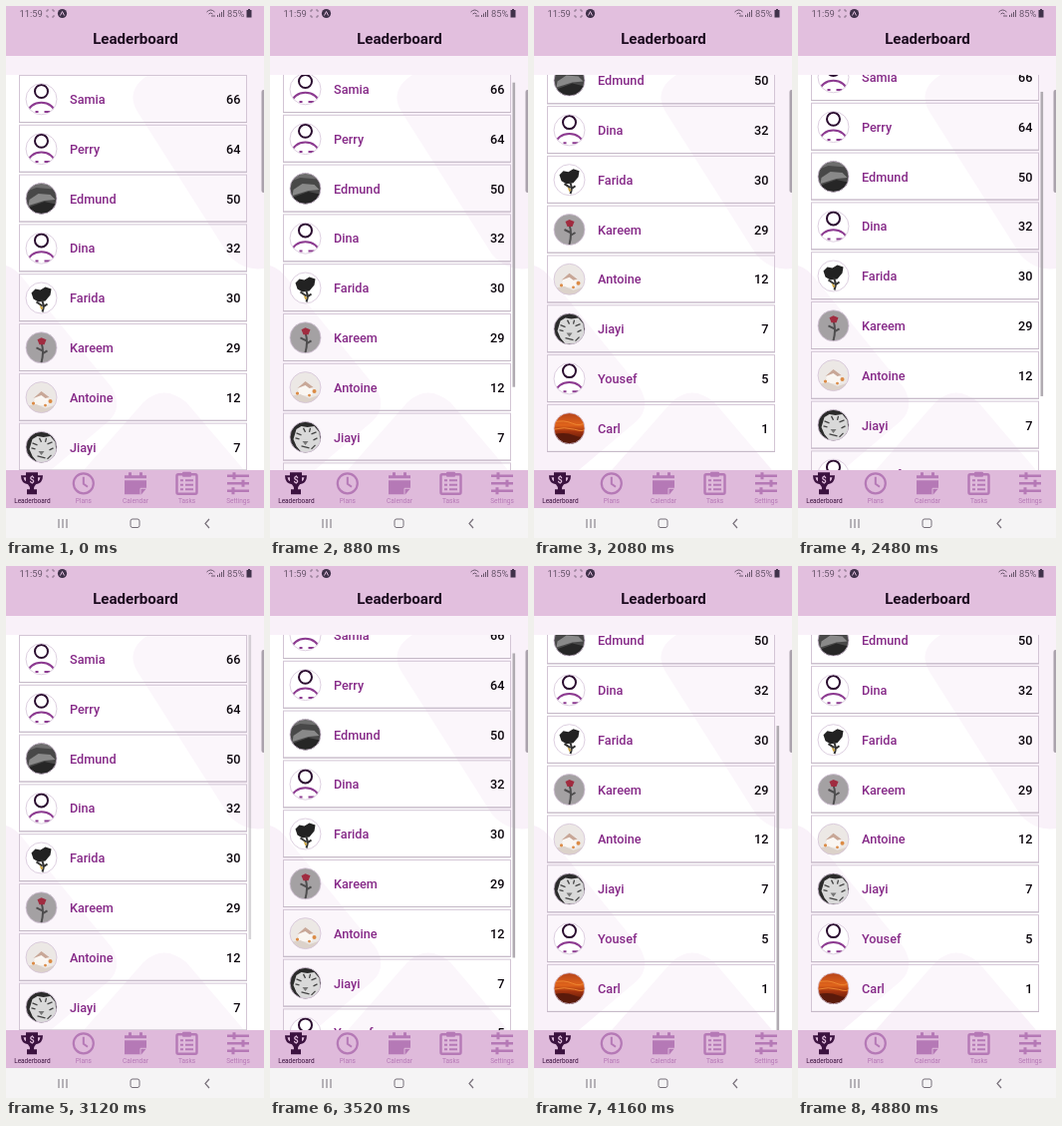
An HTML page that plays this animation: 259 px wide and 533 px high, repeating every 4.96 s.

```html
<!DOCTYPE html>
<html lang="en">
<head>
<meta charset="utf-8">
<title>Leaderboard</title>
<style>
  html, body { margin: 0; width: 100%; height: 100%; overflow: hidden; background: #fff; }
  svg { display: block; width: 100vw; height: 100vh; }
  text { font-family: Roboto, sans-serif; }
  .title { font-size: 15.1px; font-weight: 600; fill: #1c0a1f; text-anchor: middle; }
  .name { font-size: 12.7px; font-weight: 500; fill: #862a88; }
  .score { font-size: 12.7px; font-weight: 500; fill: #0c060d; text-anchor: end; }
  .status { font-size: 9.4px; fill: #68566b; }
  .tab { font-size: 6.5px; text-anchor: middle; fill: currentColor; }
  .line { fill: none; stroke: currentColor; }
</style>
</head>
<body>
<svg viewBox="0 0 259 533" preserveAspectRatio="none">
  <defs>
    <clipPath id="list"><rect y="69" width="259" height="396"/></clipPath>
    <clipPath id="round"><circle r="15.5"/></clipPath>
    <linearGradient id="sunset" x1="0" y1="0" x2="0" y2="1">
      <stop offset="0" stop-color="#b5431a"/>
      <stop offset=".4" stop-color="#e0641b"/>
      <stop offset=".6" stop-color="#a3330f"/>
      <stop offset="1" stop-color="#431208"/>
    </linearGradient>

    <g id="person">
      <circle r="15.5" fill="#fff"/>
      <g fill="none" stroke-width="2">
        <circle cy="-7.8" r="6.5" stroke="#2b0d30"/>
        <path d="M-13.5 14A13.5 10.5 0 0 1 13.5 14M-6 12.8H-3M3 12.8H9" stroke="#8c3a90"/>
      </g>
    </g>
    <g id="road">
      <rect x="-16" y="-16" width="32" height="32" fill="#484848"/>
      <path d="M-16-7L-5-11L16-9V-16H-16Z" fill="#6d6d6d"/>
      <path d="M-12 1L-3-5L9-4L14 1L3 2L-13 7Z" fill="#898989"/>
      <path d="M-16 10L3 3L16 6V16H-16Z" fill="#262626"/>
    </g>
    <g id="darkRose">
      <circle r="15.5" fill="#fff"/>
      <path d="M-10-5L-6-9L-1-8L4-11L10-9L9-3L4 3L-3 4L-8 1Z" fill="#222"/>
      <path d="M0 2Q4 7 1 14M1 8L-5 4M2 9L6 6" fill="none" stroke="#333" stroke-width="2"/>
      <path d="M-2 7L2 10L0 12Z" fill="#c9a23c"/>
    </g>
    <g id="redRose">
      <rect x="-16" y="-16" width="32" height="32" fill="#a4a1a3"/>
      <path d="M0-5Q3 4 0 15M1 3L-5 0M1 6L6 3" fill="none" stroke="#4e4d4e" stroke-width="2"/>
      <path d="M-4-8L0-10L5-8L3-3L-2-3Z" fill="#a02c40"/>
    </g>
    <g id="cottage">
      <rect x="-16" y="-16" width="32" height="32" fill="#ece8e5"/>
      <path d="M-7 1L0-5L7 0V8H-7Z" fill="#faf6f2"/>
      <path d="M-8 1L0-6L8 0L4 1L0-2Z" fill="#c8a797"/>
      <path d="M-16 9L-5 7L4 11L16 7V16H-16Z" fill="#dcd2ca"/>
      <g fill="#dc8b45"><circle cx="9" cy="4" r="2"/><circle cx="-8" cy="6" r="1.6"/><circle cx="4" cy="8" r="1.4"/></g>
    </g>
    <g id="tiger">
      <rect x="-16" y="-16" width="32" height="32" fill="#2b2b2b"/>
      <path d="M-9-8L-4-11L2-10L9-11L14-5L15 6L9 15H-4L-9 9L-12 2Z" fill="#d9d9d9"/>
      <path d="M-9-4L-4-2M-10 1L-6 2M11-5L6-3M12 1L8 3M-2-9L0-5M5-9L4-5M-4 9L4 11M10 8L6 12" stroke="#444" stroke-width="1.3"/>
      <path d="M-3 4H3L0 8Z" fill="#777"/>
    </g>
    <g id="dusk">
      <rect x="-16" y="-16" width="32" height="32" fill="url(#sunset)"/>
      <path d="M-16-6Q-6-9 3-5T16-7M-16 1Q-5-2 5 1T16 0" fill="none" stroke="#ec8430"/>
      <path d="M-16 6Q-4 3 5 7T16 6V16H-16Z" fill="#5b1a0b"/>
    </g>
  </defs>

  <rect width="259" height="533" fill="#fff"/>
  <g fill="#f9f1f9">
    <path d="M0 50H259V69H0Z"/>
    <path d="M143 69H259V263Q238 266 223 249L132 106Q119 84 143 69Z"/>
    <path d="M0 260Q10 263 18 274L106 382Q118 402 103 416L45 465H0Z"/>
    <path d="M78 465L138 397Q158 378 181 397L239 465Z"/>
  </g>

  <g clip-path="url(#list)">
    <g id="rows"></g>
    <rect id="thumb" x="243.5" width="2.6" height="305" fill="#b0abb1"/>
  </g>
  <rect x="256.5" y="84" width="4" height="103" rx="2" fill="#aaa2ac"/>

  <rect width="259" height="50" fill="#e2bfde"/>
  <text class="title" x="130" y="37.8">Leaderboard</text>
  <g color="#68566b">
    <text class="status" x="13.5" y="11">11:59</text>
    <path class="line" stroke-width=".7" d="M41 6V4H43M46 4H48V6M48 9V11H46M43 11H41V9"/>
    <circle cx="56.5" cy="7.5" r="4.6" fill="#40324a"/>
    <path d="M54.5 9.5L56.5 5.5L58.5 9.5" fill="none" stroke="#e2bfde"/>
    <path class="line" d="M201.5 6Q205.5 2 209.5 6M203.5 8Q205.5 6 207.5 8M206 10H210"/>
    <path class="line" d="M212.5 11V9M214.5 11V7.5M216.5 11V6M218.5 11V4"/>
    <text class="status" x="222" y="11">85%</text>
    <path d="M241.5 4H243V3H245V4H246.5V11.5H241.5Z" fill="#40324a"/>
  </g>

  <rect y="465" width="259" height="38" fill="#dfbadb"/>
  <g transform="translate(0 -.7)">
    <g color="#3b123f">
      <path d="M20 468H32V471H37Q37 479 30 480Q28 482 28 485H31V490H21V485H24Q24 482 22 480Q15 479 15 471H20Z" fill="currentColor"/>
      <path d="M17.5 473H20V477Q18 476 17.5 473M32 473H34.5Q34 476 32 477Z" fill="#dfbadb"/>
      <text x="26" y="478.5" font-size="9" font-weight="700" text-anchor="middle" fill="#dfbadb">$</text>
      <text class="tab" x="26.4" y="499">Leaderboard</text>
    </g>
    <g color="#b579b6">
      <circle class="line" cx="77.8" cy="479" r="10" stroke-width="2.2"/>
      <path class="line" d="M77.8 472.5V479.5L82 482.5" stroke-width="2"/>
      <text class="tab" x="77.8" y="499">Plans</text>

      <path d="M119 471H123V468H126V471H134V468H137V471H141V474H119ZM119 476H141V484L136 490H119Z" fill="currentColor"/>
      <path d="M135 490V484H141" fill="none" stroke="#dfbadb"/>
      <text class="tab" x="130" y="499">Calendar</text>

      <rect class="line" x="171.5" y="470" width="20" height="19.5" rx="1.5" stroke-width="2.4"/>
      <rect x="177" y="467.5" width="9" height="5" rx="1" fill="currentColor"/>
      <path class="line" d="M175 476H178M180 476H188M175 480.5H178M180 480.5H188M175 485H178M180 485H188" stroke-width="2"/>
      <text class="tab" x="181.5" y="499">Tasks</text>

      <path class="line" d="M222 471.5H244M222 479H244M222 486.5H244" stroke-width="2.6"/>
      <path class="line" d="M229 468V475M238 475.5V482.5M228 483V490" stroke-width="3"/>
      <text class="tab" x="233" y="499">Settings</text>
    </g>
  </g>

  <rect y="503" width="259" height="30" fill="#f5f4f5"/>
  <g color="#77707a">
    <path class="line" d="M53 514V523M57 514V523M61 514V523"/>
    <rect class="line" x="125" y="514" width="9" height="8.5" rx="2"/>
    <path class="line" d="M204 514L200 518.5L204 523" stroke-width="1.2"/>
  </g>
</svg>
<script>
  const LOOP = 4960, STEP = 80, PITCH = 49.8, TOP = 69, END = 118.3;
  const people = [
    ["Samia", 66, "person"], ["Perry", 64, "person"], ["Edmund", 50, "road"],
    ["Dina", 32, "person"], ["Farida", 30, "darkRose"], ["Kareem", 29, "redRose"],
    ["Antoine", 12, "cottage"], ["Jiayi", 7, "tiger"], ["Yousef", 5, "person"],
    ["Carl", 1, "dusk"]
  ];
  const rows = document.getElementById("rows");
  const thumb = document.getElementById("thumb");

  rows.innerHTML = people.map(([name, score, avatar], i) => `
    <g transform="translate(0 ${TOP + i * PITCH})">
      <rect x="13.5" y=".5" width="228" height="47" fill="#fff" fill-opacity=".3" stroke="#d3c5d5"/>
      <path d="M13 47.5H242" stroke="#c4b8c6"/>
      <g transform="translate(35.5 24.3)">
        <use href="#${avatar}" clip-path="url(#round)"/>
        <circle r="15.5" fill="none" stroke="#d5c3d8" stroke-width=".8"/>
      </g>
      <text class="name" x="64" y="29">${name}</text>
      <text class="score" x="235.5" y="29">${score}</text>
    </g>`).join("");
  const lastAvatar = rows.lastElementChild.querySelector("use");

  // [time, value] points: drag, then a decelerating fling
  const scrollPath = [
    [640, 0], [800, 4], [880, 10], [960, 32], [1120, 82], [1200, 98], [1280, 108], [1440, 117], [1520, END],
    [2160, END], [2240, 104], [2400, 44], [2480, 22], [2560, 10], [2640, 3], [2720, 0],
    [3360, 0], [3440, 8], [3520, 24], [3760, 84.5], [3840, 98], [3920, 107], [4080, 116.5], [4160, END]
  ];
  const thumbFade = [
    [640, 0], [720, 1], [1680, 1], [1920, 0], [2080, 0], [2160, 1],
    [3040, 1], [3200, 0], [3280, 0], [3360, 1], [4480, 1], [4800, 0]
  ];
  const avatarFade = [[3600, 1], [3680, .3], [3760, .6], [3920, 1]];

  function valueAt(points, t) {
    const next = points.findIndex(p => p[0] > t);
    if (next === 0) return points[0][1];
    if (next < 0) return points[points.length - 1][1];
    const [t0, a] = points[next - 1], [t1, b] = points[next];
    return a + (b - a) * (t - t0) / (t1 - t0);
  }

  function draw() {
    const t = Math.floor(performance.now() % LOOP / STEP) * STEP;
    const scroll = valueAt(scrollPath, t);
    rows.setAttribute("transform", `translate(0 ${-scroll})`);
    thumb.setAttribute("y", TOP + scroll * 0.77);
    thumb.setAttribute("opacity", valueAt(thumbFade, t));
    lastAvatar.setAttribute("opacity", valueAt(avatarFade, t));
    requestAnimationFrame(draw);
  }
  draw();
</script>
</body>
</html>
```
